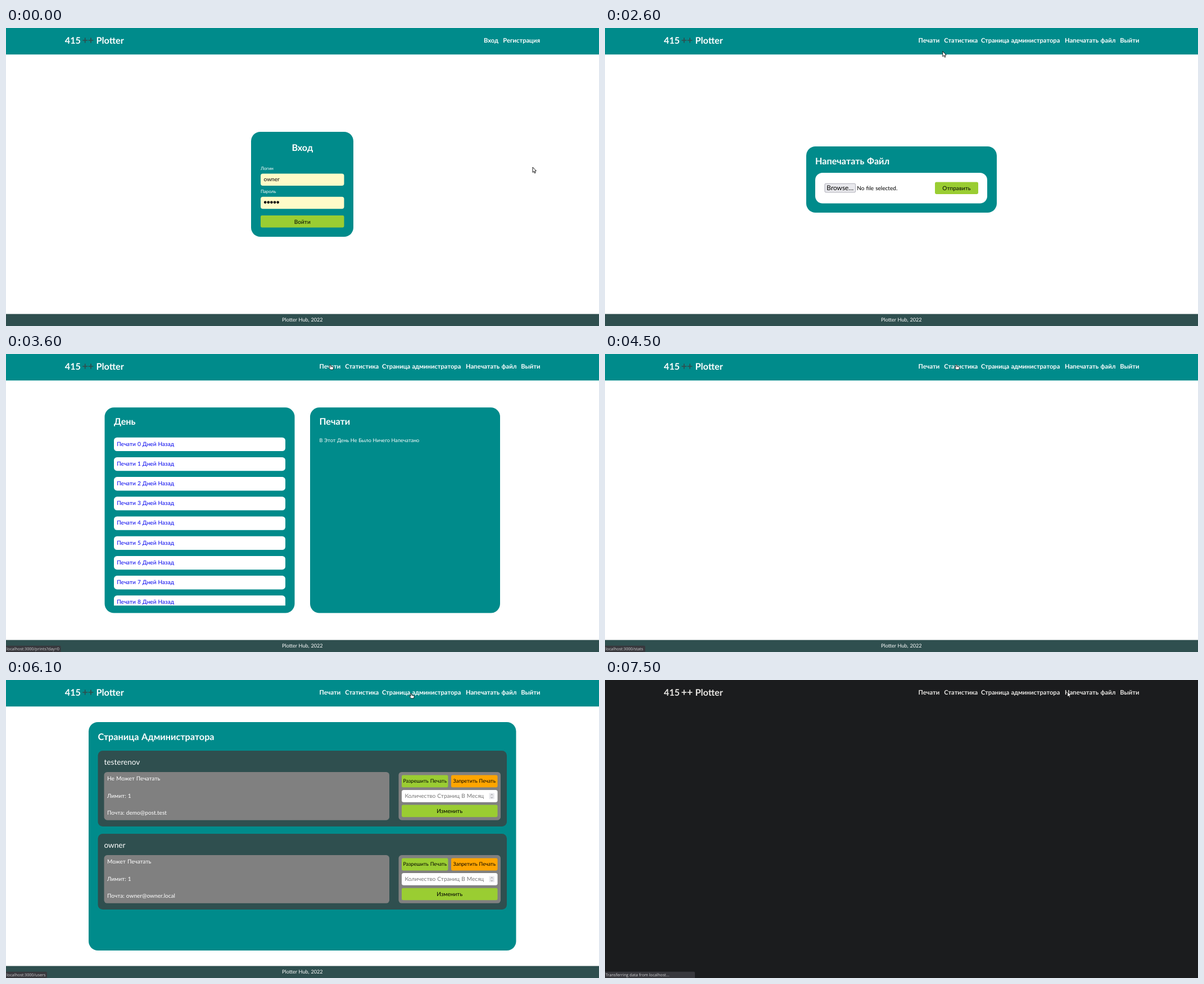
An HTML page for the animation above (8000 ms loop, 1055 by 531 pixels).

```html
<!DOCTYPE html>
<html lang="ru">
<head>
<meta charset="utf-8">
<title>Plotter Hub</title>
<style>
html, body { margin: 0; width: 100%; height: 100%; overflow: hidden; background: #fff; }
svg { display: block; width: 1055px; height: 531px; }
text {
  font-family: Lato, Carlito, "Open Sans", sans-serif;
  font-size: 10.1px; word-spacing: .045em; fill: #fff;
  text-rendering: geometricPrecision; white-space: pre;
}
.h { font-size: 16.2px; font-weight: 700; }
.nav { font-size: 11.15px; font-weight: 700; }
.small { font-size: 8.1px; }
.note { font-size: 9.1px; }
.user { font-size: 13.6px; }
.plus { font-size: 18px; font-weight: 700; fill: #2f4f4f; }
.dark { fill: #000; }
.link { fill: #00e; }
.hint { fill: #757575; }
.browse { font-size: 11.9px; fill: #000; }
.mid { text-anchor: middle; }
.axis { font: 6.55px "Liberation Sans", Arial, sans-serif; fill: #666; word-spacing: 0; }
.end { text-anchor: end; }
.status { font: 7.2px "Open Sans", sans-serif; fill: #d2d2d4; word-spacing: 0; }
.night .nav, .night .h { fill: #e8e6e3; }
.night .plus { fill: #e8e6e3; }
</style>
</head>
<body>
<svg id="stage" viewBox="0 0 1055 531"></svg>
<script>
const TEAL = '#008b8b', SLATE = '#2f4f4f', LIME = '#9acd32', PINK = '#ff6384';
const LOOP = 8000;

const range = (n, fn) => Array.from({ length: n }, (_, i) => fn(i)).join('');
const box = (x, y, x2, y2, r, fill, extra = '') =>
  `<rect x="${x}" y="${y}" width="${x2 - x}" height="${y2 - y}" rx="${r}" fill="${fill}" ${extra}/>`;
const text = (x, y, s, cls = '', extra = '') =>
  `<text x="${x}" y="${y}" class="${cls}" ${extra}>${s}</text>`;
const line = (x, y, x2, y2, color) =>
  `<path d="M${x} ${y}L${x2} ${y2}" stroke="${color}" stroke-width=".6"/>`;
const card = (x, y, x2, y2) => box(x, y, x2, y2, 16.5, TEAL);
const button = (x, y, x2, y2, s, base, cls = '', fill = LIME) =>
  box(x, y, x2, y2, 2.4, fill) + text((x + x2) / 2, base, s, 'mid dark ' + cls);
const group = (id, body, extra = '') => `<g id="${id}" ${extra}>${body}</g>`;

// Pages
const login = () =>
  card(436, 185, 618, 372) +
  text(527.3, 219, 'Вход', 'h mid') +
  text(453, 253, 'Логин', 'small') +
  box(453, 259.5, 601.5, 281, 4, '#fffbc8') +
  text(458.5, 273, 'owner', 'dark') +
  text(453, 294.3, 'Пароль', 'small') +
  box(453, 300.7, 601.5, 322.3, 4, '#fffbc8') +
  range(5, i => `<circle cx="${461.2 + 5.6 * i}" cy="310.6" r="2.3"/>`) +
  button(453, 334, 601.5, 355.5, 'Войти', 348.5);

const upload = () =>
  card(358, 211, 697, 329) +
  text(374, 243.3, 'Напечатать Файл', 'h') +
  box(374, 258, 680, 312.5, 13, '#fff') +
  box(391, 277.2, 445.7, 292.8, 2, '#e9e9ed', 'stroke="#8f8f9d" stroke-width=".7"') +
  text(418.3, 289, 'Browse…', 'browse mid') +
  text(448.3, 289, 'No file selected.', 'dark') +
  button(587, 274.5, 664, 296, 'Отправить', 289);

const prints = () =>
  card(175.5, 95.3, 513.5, 461.5) + card(541, 95.3, 879, 461.5) +
  text(192, 126.3, 'День', 'h') + text(557.5, 126.3, 'Печати', 'h') +
  text(557.5, 157.3, 'В Этот День Не Было Ничего Напечатано', 'note') +
  '<clipPath id="list"><path d="M175 130H513V448.3H175Z"/></clipPath>' +
  group('days', range(9, i =>
    box(192, 148.7 + 35.2 * i, 497, 173 + 35.2 * i, 5.5, '#fff') +
    text(197.3, 163.6 + 35.2 * i, `Печати ${i} Дней Назад`, 'link')), 'clip-path="url(#list)"');

const X0 = 136.5, DX = 27.88, Y0 = 461.5, DY = 47.1;
const values = { 21: 640, 22: 320, 28: 14430 };
const px = i => X0 + DX * i;
const py = (i, k) => Y0 - (values[i] || 0) / 2000 * DY * k;
const date = i => new Date(Date.UTC(2022, 4, 10 + i)).toISOString()
  .slice(0, 10).split('-').reverse().join('.');

const stats = () =>
  box(457.5, 71.7, 481, 80, 0, PINK) +
  text(483.5, 78, 'Расход Бумаги За Последний Месяц', 'axis') +
  range(9, i =>
    line(131.5, Y0 - DY * i, px(29), Y0 - DY * i, i ? '#e2e2e2' : '#ccc') +
    text(130.5, Y0 + 2.2 - DY * i, (2000 * i).toLocaleString('en-US'), 'axis end')) +
  range(30, i =>
    line(px(i), Y0 - 8 * DY, px(i), 466.5, i ? '#e2e2e2' : '#ccc') +
    text(0, 0, date(i), 'axis end', `transform="translate(${px(i) + 2.5} 472) rotate(-25)"`)) +
  `<path id="curve" fill="none" stroke="${PINK}" stroke-width="1.65" stroke-linejoin="round"/>` +
  group('dots', range(30, i => `<circle cx="${px(i)}" r="1.9"/>`), `fill="${PINK}"`);

const account = (y, name, can, mail) => group(name,
  box(163.5, 126, 891, 261, 8.5, SLATE) +
  text(174.5, 150.7, name, 'user') +
  box(174.5, 164, 682, 249.7, 5.5, '#808080') +
  text(180, 178.8, can) + text(180, 209.6, 'Лимит: 1') + text(180, 240.4, 'Почта: ' + mail) +
  box(698.5, 164, 880, 249.7, 5.5, '#808080') +
  button(704, 169.5, 786.5, 191.3, 'Разрешить Печать', 183.3, 'note') +
  button(792, 169.5, 874.5, 191.3, 'Запретить Печать', 183.3, 'note', '#ffa500') +
  box(704, 196, 874.5, 217.7, 3.5, '#fff') +
  text(709.4, 209.8, 'Количество Страниц В Месяц', 'hint') +
  box(859.5, 201.5, 869, 212.2, 1, '#e9e9ed') +
  '<path d="M862.4 205.4l1.9-1.9l1.9 1.9m0 3l-1.9 1.9l-1.9-1.9" fill="none" stroke="#666" stroke-width=".7"/>' +
  button(704, 222.6, 874.5, 244.2, 'Изменить', 237.2),
  `transform="translate(0 ${y})"`);

const users = () =>
  card(147, 75, 907.5, 482) +
  text(163.5, 106.8, 'Страница Администратора', 'h') +
  account(0, 'testerenov', 'Не Может Печатать', 'demo@post.test') +
  account(148.1, 'owner', 'Может Печатать', 'owner@owner.local');

const nav = items => items.map(([x, s]) => text(x, 26, s, 'nav')).join('');
const arrow = '<path d="M0 0V9.3L2.1 7.4L3.6 10.7L5.1 10L3.7 6.9L6.4 6.6Z" fill="#fff" stroke="#000" stroke-width=".9" stroke-linejoin="round"/>';
const hand = '<path d="M2.2 .8Q3.2 0 3.8 1L4.5 3.4L8 4.2Q9 4.5 8.9 5.8L8.2 9.4H3.8L.7 6.2Q.4 5.2 1.7 5.3L2.8 5.8Z" fill="#fff" stroke="#000" stroke-width=".8" stroke-linejoin="round"/>' +
  '<path d="M5 5.4v-1.6M6.7 5.6v-1.5" stroke="#000" stroke-width=".5"/>';

const pages = { login, upload, prints, stats, users };
const stage = document.getElementById('stage');
stage.innerHTML =
  '<rect id="paper" width="1055" height="531"/>' +
  group('bars', box(0, 0, 1055, 47.2, 0, TEAL)) +
  group('footer', box(0, 509.6, 1055, 531, 0, SLATE) + text(527.3, 523.3, 'Plotter Hub, 2022', 'note mid')) +
  text(104.8, 28, '415', 'h') + text(135.4, 27.6, '++', 'plus') + text(160.6, 28, 'Plotter', 'h') +
  group('guest', nav([[850, 'Вход'], [884.3, 'Регистрация']])) +
  group('member', nav([[557.5, 'Печати'], [603.3, 'Статистика'], [669, 'Страница администратора'],
    [818, 'Напечатать файл'], [916.2, 'Выйти']])) +
  Object.entries(pages).map(([id, draw]) => group(id, draw())).join('') +
  group('status', '<rect id="tip" x="-3" y="519.8" height="15" rx="2" fill="#38383d"/>' +
    text(1, 528.4, '', 'status', 'id="tipText"')) +
  group('arrow', arrow) + group('hand', hand);

const el = id => document.getElementById(id);
const show = (id, on) => { el(id).style.display = on ? '' : 'none'; };

// [time, page]
const pageSteps = [[0, 'login'], [1400, 'upload'], [3400, 'empty'], [3600, 'prints'],
  [4500, 'blank'], [4700, 'stats'], [6100, 'users'], [7500, 'night']];

// [time, text, bar width]
const host = 'localhost:3000/';
const statusSteps = [[0, '', 0], [1200, 'localhost', 160], [1600, '', 0],
  [3100, host + 'prints?day=0', 97.5], [3900, host + 'stats', 71.5], [5500, host + 'users', 73],
  [5900, 'localhost', 160], [6100, host + 'users', 73], [6600, host + 'printer', 77.5],
  [7500, 'Transferring data from localhost…', 160]];

// [time, x, y, shape, glide duration]
const cursorSteps = [
  [0, 937, 248, 'arrow'], [600, 700, 368, 'arrow', 400], [800, 605, 383, 'arrow', 200],
  [1000, 567, 347, 'arrow', 200], [2000, 950, 371, 'arrow', 900], [2100, 892, 302, 'arrow'],
  [2200, 821, 233, 'arrow'], [2400, 819.5, 232.5, 'arrow'], [2600, 600.8, 41.5, 'arrow'],
  [2800, 588, 24, 'arrow'], [2900, 574, 12.5, 'hand'], [3100, 574, 16, 'hand'],
  [3200, 573.7, 18.5, 'hand'], [3900, 607.5, 23, 'hand'], [4100, 619.5, 20, 'hand'],
  [4300, 621.5, 18.3, 'hand'], [5100, 650.3, 19.5, 'hand'], [5300, 672, 20, 'hand'],
  [5500, 706, 15, 'hand'], [5600, 716.5, 22, 'hand'], [5900, 720, 24, 'arrow'],
  [6100, 717.3, 23.3, 'hand'], [6400, 722.3, 23.3, 'hand'], [6600, 790, 20, 'hand'],
  [6700, 831.5, 16.5, 'hand'], [6900, 832.5, 17, 'hand'], [7000, 833.4, 17.3, 'hand'],
  [7500, 822.8, 20.8, 'arrow']];

const at = (steps, t) => steps.findLast(s => s[0] <= t);

function cursorAt(t) {
  const i = cursorSteps.findLastIndex(s => s[0] <= t);
  const [, x, y, shape] = cursorSteps[i];
  const next = cursorSteps[i + 1];
  const k = next && next[4] ? Math.max(0, 1 - (next[0] - t) / next[4]) : 0;
  return k ? [x + (next[1] - x) * k, y + (next[2] - y) * k, shape] : [x, y, shape];
}

function drawCurve(t) {
  const held = 4700 + 200 * Math.floor((t - 4700) / 200);
  const p = Math.min(1, Math.max(0, (held - 4580) / 1000));
  const k = 1 - (1 - p) ** 4;
  el('curve').setAttribute('d', 'M' + range(30, i => `${i ? 'L' : ''}${px(i)} ${py(i, k)}`));
  [...el('dots').children].forEach((dot, i) => dot.setAttribute('cy', py(i, k)));
}

function render(t) {
  const page = at(pageSteps, t)[1], night = page === 'night';
  for (const id in pages) show(id, id === page);
  show('bars', !night);
  show('footer', !night && page !== 'empty');
  show('guest', page === 'login');
  show('member', page !== 'login');
  stage.classList.toggle('night', night);
  el('paper').setAttribute('fill', night ? '#1b1c1e' : '#fff');
  if (page === 'stats') drawCurve(t);

  const [, label, width] = at(statusSteps, t);
  show('status', label);
  el('tipText').textContent = label;
  el('tip').setAttribute('width', width + 3);

  const [x, y, shape] = cursorAt(t);
  for (const id of ['arrow', 'hand']) show(id, id === shape);
  el(shape).setAttribute('transform', `translate(${x} ${y})`);
}

let last = -1;
function tick() {
  const t = Math.floor(performance.now() % LOOP / 100) * 100;
  if (t !== last) render(last = t);
  requestAnimationFrame(tick);
}
tick();
</script>
</body>
</html>
```
